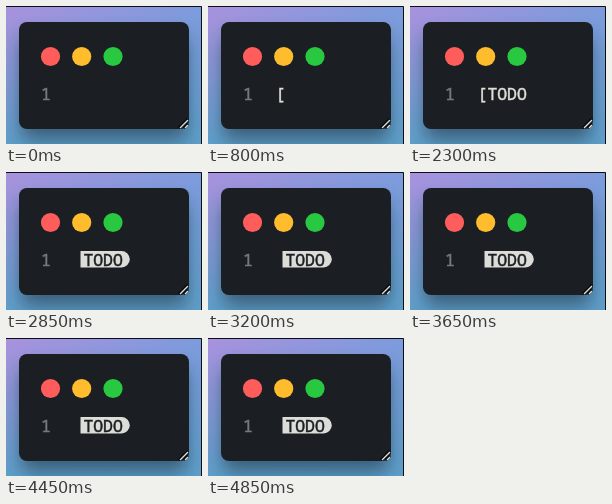
These frames come from a looping animation (196x138 px, 4900 ms). An HTML page:

```html
<!DOCTYPE html>
<html lang="en">
<head>
<meta charset="utf-8">
<title>Typing a tag</title>
<style>
html, body { margin: 0; width: 100%; height: 100%; overflow: hidden; }
svg { display: block; width: 196px; height: 138px; }
text { font: 16.4px "Noto Sans Mono", "DejaVu Sans Mono", monospace; white-space: pre; stroke-width: .45px; }
</style>
</head>
<body>
<svg viewBox="0 0 196 138">
  <defs>
    <linearGradient id="top">
      <stop offset="0" stop-color="#aa91de"/>
      <stop offset="1" stop-color="#7d9bdd"/>
    </linearGradient>
    <linearGradient id="low" x2="0" y2="1">
      <stop offset="0" stop-color="#5f9fca" stop-opacity="0"/>
      <stop offset="1" stop-color="#5f9fca"/>
    </linearGradient>
    <filter id="blur" x="-30%" y="-30%" width="160%" height="160%">
      <feGaussianBlur stdDeviation="9"/>
    </filter>
  </defs>
  <rect width="196" height="138" fill="url(#top)"/>
  <rect width="196" height="138" fill="url(#low)"/>
  <rect x="15" y="30" width="166" height="104" rx="8" fill="#10202c" opacity=".5" filter="url(#blur)"/>
  <path d="M0 .5H195.5V138" fill="none" stroke="#0c0e12"/>
  <path id="edge" d="M19 .5H45" stroke="#46518c" stroke-dasharray="7 2"/>
  <rect x="13" y="16" width="170" height="107" rx="8" fill="#1b1f23"/>
  <circle cx="44.5" cy="50.5" r="9.6" fill="#ff5c5c"/>
  <circle cx="75.7" cy="50.5" r="9.6" fill="#ffbd2e"/>
  <circle cx="107" cy="50.5" r="9.6" fill="#28c840"/>
  <path d="M173 122L182 113M178 122L182 118" stroke="#050607" stroke-width="2.6"/>
  <path d="M174 122L182 114M179 122L182 119" stroke="#dcdedf" stroke-width="1.4"/>
  <text x="35" y="94" fill="#737a7f" stroke="#737a7f">1</text>
  <path id="tag" d="M74.5 79H115.5A8.2 8.2 0 0 1 115.5 95.5H74.5Z" fill="#dcddd8"/>
  <text id="code" x="67.6" y="94"></text>
</svg>
<script>
const LOOP = 4900, TAG_AT = 2550;
const keys = [[550, "["], [900, "T"], [1200, "O"], [1700, "D"], [2150, "O"]];
const [edge, tag, code] = ["edge", "tag", "code"].map(id => document.getElementById(id));
const show = (el, on) => el.setAttribute("visibility", on ? "visible" : "hidden");

function draw(now) {
  const t = now % LOOP, tagged = t >= TAG_AT;
  const typed = keys.filter(([at]) => t >= at).map(([, key]) => key).join("");
  const ink = tagged ? "#1b1f23" : "#dfe0d8";
  code.textContent = tagged ? " TODO" : typed;
  code.setAttribute("fill", ink);
  code.setAttribute("stroke", ink);
  show(tag, tagged);
  show(edge, t >= 1000 && t < 2300);
  requestAnimationFrame(draw);
}
draw(0);
</script>
</body>
</html>
```
